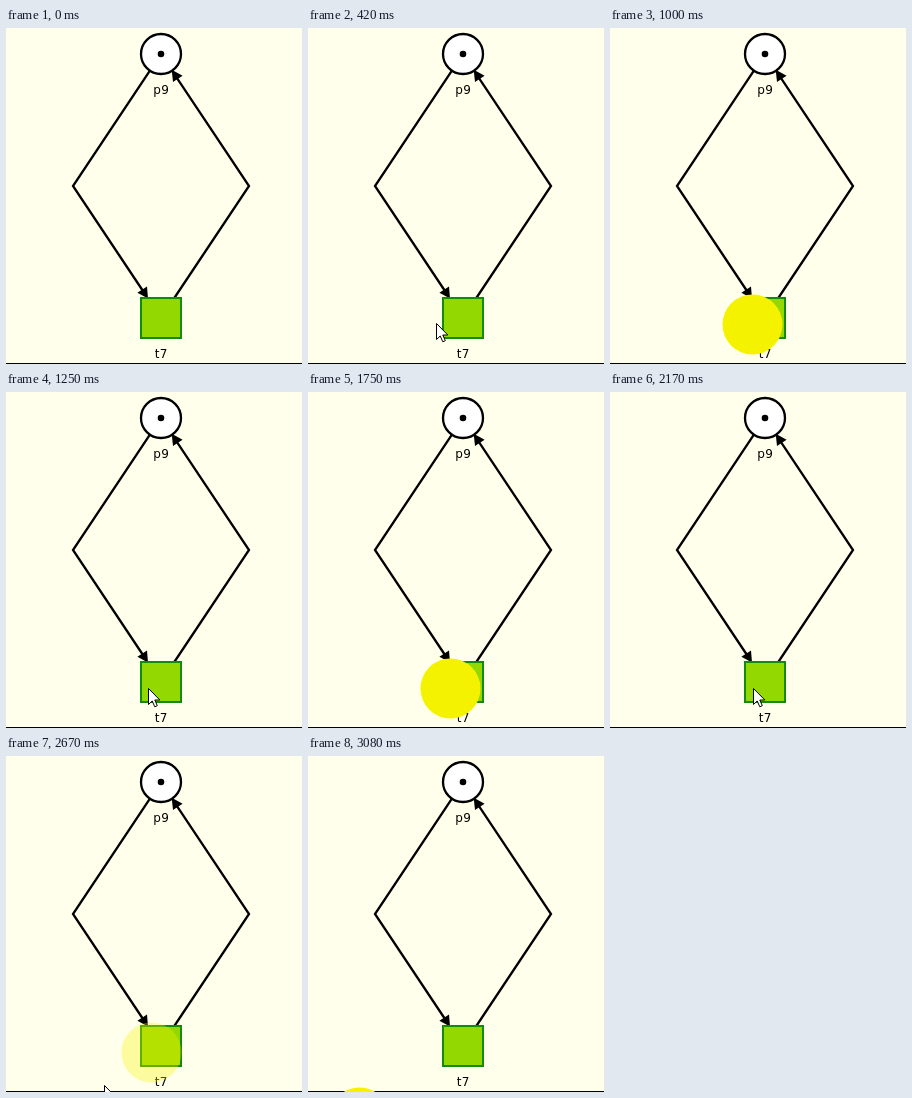
Write an HTML page that moves like this. It is 296x336 px and loops after 3260 ms.

```html
<!DOCTYPE html>
<html lang="en">
<head>
<meta charset="utf-8">
<title>Petri net loop</title>
<style>
  html, body { margin: 0; width: 100%; height: 100%; overflow: hidden; background: #ffffeb; }
  svg { display: block; width: 100%; height: 100%; }
  text { font: 12px "DejaVu Sans", sans-serif; letter-spacing: .5px; text-anchor: middle; }
  .arc { fill: none; stroke: #000; stroke-width: 2.3; }
</style>
</head>
<body>
<svg viewBox="0 0 296 336">
  <rect y="335" width="296" height="1"/>

  <path class="arc" d="M143.9 42.6 L67 158 L138 264.5"/>
  <path class="arc" d="M168.3 270 L243 158 L169.5 47.8"/>
  <path d="M142 270.5 L131.4 264.8 L141 258.4 Z"/>
  <path d="M165.7 41.8 L176.6 47.8 L167 54.1 Z"/>

  <circle cx="155" cy="26" r="20" fill="#fff" stroke="#000" stroke-width="2.3"/>
  <circle cx="155" cy="26" r="3.3"/>
  <text x="155.3" y="66">p9</text>

  <rect x="135" y="270" width="40" height="40" fill="#93d800" stroke="#128a0c" stroke-width="2"/>
  <text x="155.3" y="330">t7</text>

  <path id="cursor" d="M.5 .5 V16.5 L4.2 13 L6.8 18.8 L9.3 17.7 L6.8 12 H11.8 Z"
        fill="#fff" stroke="#000" stroke-linejoin="round"/>
  <circle id="glow" r="30" fill="#f5f200"/>
</svg>
<script>
  const LOOP = 3260;
  const STEP = 1000 / 12;
  const LAST = 37;  // the final step holds until the loop restarts
  const FADE = 3;   // steps a click glow lasts

  const away = [51, 361], edge = [128, 295], box = [142, 296], nudge = [145, 296];

  // pointer rests and moves: step, place
  const path = [
    [0, away], [5, edge], [7, edge], [8, box],
    [25, box], [28, nudge], [30, nudge], [34, away], [LAST, away]
  ];
  const clicks = [10, 12, 21, 30, LAST];

  const cursor = document.getElementById("cursor");
  const glow = document.getElementById("glow");
  const ease = u => u * u * (3 - 2 * u);
  const place = (el, [x, y]) => el.setAttribute("transform", `translate(${x} ${y})`);

  function pointer(n) {
    const i = Math.max(1, path.findIndex(key => key[0] >= n));
    const [n0, from] = path[i - 1];
    const [n1, to] = path[i];
    const u = ease((n - n0) / (n1 - n0));
    return from.map((v, k) => Math.round(v + (to[k] - v) * u));
  }

  function draw(t) {
    // steps begin on the 10 ms mark below their exact time
    const n = Math.min(LAST, Math.floor((t + 9.9) / STEP));
    const click = clicks.findLast(c => c <= n) ?? -FADE;
    place(cursor, pointer(n));
    place(glow, pointer(Math.max(0, click)).map(v => v + .5));
    glow.setAttribute("opacity", Math.max(0, 1 - (n - click) / FADE));
  }

  const start = performance.now();
  function tick() {
    draw((performance.now() - start) % LOOP);
    requestAnimationFrame(tick);
  }
  tick();
</script>
</body>
</html>
```
